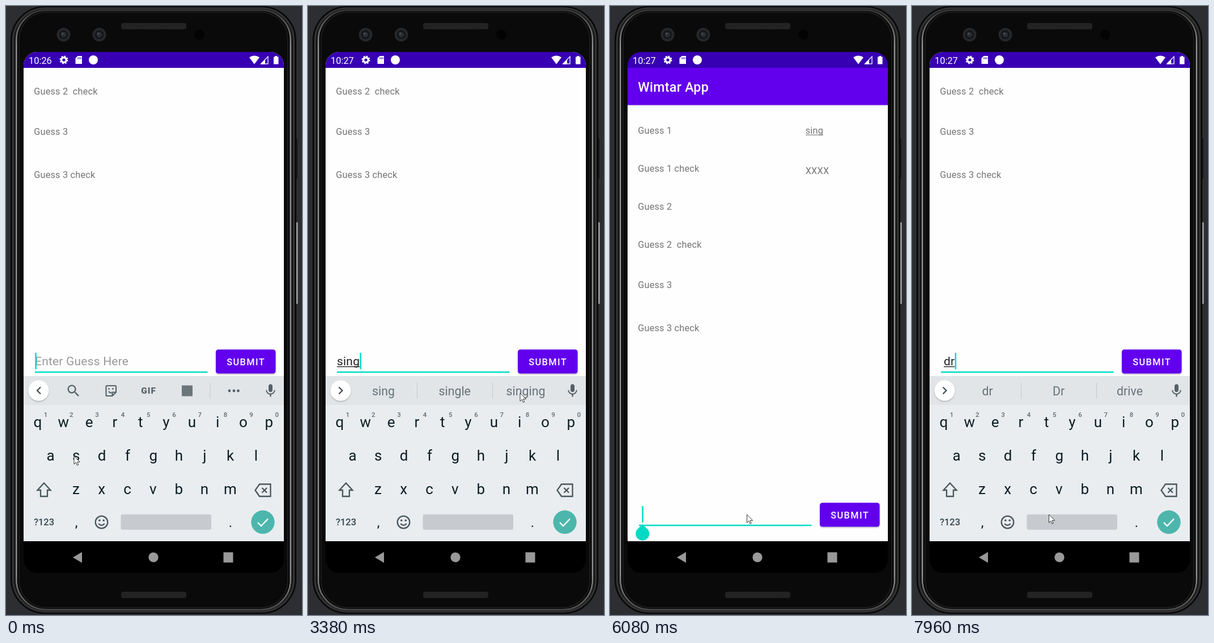
An HTML page that plays this animation: 522x1073 px, repeating every 8000 ms.

```html
<!DOCTYPE html>
<html lang="en">
<head>
<meta charset="utf-8">
<title>Word guessing app</title>
<style>
html, body { margin: 0; width: 100%; height: 100%; overflow: hidden; background: #2d2e32; }
svg { display: block; width: 522px; height: 1073px; font-family: Roboto, sans-serif; }
text { white-space: pre; }
.label { font-size: 16.3px; letter-spacing: .2px; fill: #737373; }
.field { font-size: 21px; letter-spacing: .0094em; }
.mid { text-anchor: middle; }
.line { fill: none; stroke: #48555b; stroke-width: 2.3; }
</style>
</head>
<body>
<svg id="stage" viewBox="0 0 522 1073"></svg>
<script>
const rect = (x, y, w, h, fill, more = '') =>
  `<rect x="${x}" y="${y}" width="${w}" height="${h}" fill="${fill}" ${more}/>`;
const disc = (x, y, r, fill, more = '') =>
  `<circle cx="${x}" cy="${y}" r="${r}" fill="${fill}" ${more}/>`;
const path = (d, more = '') => `<path d="${d}" ${more}/>`;
const text = (x, y, s, more = '') => `<text x="${x}" y="${y}" ${more}>${s}</text>`;
const icon = (x, y, d) =>
  path(d, `fill="#566167" transform="translate(${x} ${y}) scale(1.166) translate(-12 -12)"`);

const camera = x => disc(x, 50.5, 12, '#26282b') + disc(x, 50.5, 8, '#15171a') +
  disc(x, 50.5, 4.5, '#2b2e32') + disc(x - 2, 48.5, 1.5, '#555a60');
const speaker = y => rect(203, y, 115, 11, '#191919', 'rx="4"') +
  rect(203, y, 115, 11, 'url(#mesh)', 'rx="4"');

const phone = `
  ${rect(0, 0, 522, 1073, '#2d2e32')}
  ${rect(510, 233, 4, 72, '#17181a', 'rx="2"')}
  ${rect(511, 381, 3.5, 144, '#a5a7a9', 'rx="1.5"')}
  ${rect(9, 1, 502, 1069, '#161616', 'rx="60" stroke="#070707" stroke-width="2"')}
  ${rect(12.5, 4, 495, 1063, 'none', 'rx="57" stroke="#333" stroke-width="3"')}
  ${rect(18.3, 7.5, 483.5, 1056, '#050505', 'rx="52" stroke="url(#silver)" stroke-width="2.6"')}
  ${rect(23, 11, 474, 1049, '#0a0a0a', 'rx="48" stroke="#1c1c1c" stroke-width="2"')}
  ${camera(101.5)}${camera(164.5)}${disc(341, 50.5, 9, '#030303')}
  ${speaker(30)}${speaker(1032)}`;

const labels = [['Guess 1', 225], ['Guess 1 check', 292], ['Guess 2', 358.7],
  ['Guess 2  check', 425.7], ['Guess 3', 497], ['Guess 3 check', 573]]
  .map(([s, y]) => text(49.2, y, s, 'class="label"')).join('');

const app = `
  ${rect(31, 109, 459, 834, '#fefefe')}
  ${rect(31, 109, 459, 65.5, '#6200ee', 'filter="url(#soft)"')}
  ${text(49.3, 151.3, 'Wimtar App', 'fill="#fff" font-size="23.3" font-weight="500" letter-spacing=".25"')}
  ${labels}
  <g id="result">
    ${text(344.7, 225, 'sing', 'class="label"')}${rect(345, 226.6, 31, 1.1, '#737373')}
    ${text(344.7, 296, 'XXXX', 'class="label"')}
  </g>
  ${rect(51, 913.8, 304.5, 2.5, '#03dac5')}
  ${text(51, 903, 'Enter Guess Here', 'id="hint" class="field" fill="#999"')}
  ${text(51, 903, '', 'id="typed" class="field" fill="#212121"')}
  ${rect(51, 904.8, 0, 1.4, '#212121', 'id="under"')}
  ${rect(51, 881, 2.5, 29, '#03dac5', 'id="caret"')}
  ${rect(370, 875.3, 105.5, 42.3, '#6200ee', 'rx="4.5" filter="url(#shade)"')}
  ${text(423.2, 902.8, 'SUBMIT', 'class="mid" fill="#fff" font-size="16.3" font-weight="500" letter-spacing="1.46"')}`;

const status = `
  ${rect(31, 81, 459, 28, '#3700b3')}
  ${text(40, 101.5, '', 'id="clock" fill="#fff" font-size="16.4"')}
  ${disc(102, 95, 4.3, 'none', 'stroke="#fff" stroke-width="3.4"')}
  ${disc(102, 95, 6.4, 'none', 'stroke="#fff" stroke-width="2.2" stroke-dasharray="2.51"')}
  ${path('M126.500 88H134V102H122.500V92Z', 'fill="#fff"')}
  ${path('M127 90.500v3M129.500 90.500v3M132 90.500v3', 'stroke="#3700b3" stroke-width="1.2"')}
  ${disc(154, 95, 8, '#fff')}
  ${path('M429 90.500Q438 84.500 447 90.500L438 102.500Z', 'fill="#fff"')}
  ${path('M449.800 101.800L462 89V101.800Z', 'fill="none" stroke="#fff" stroke-width="1.3"')}
  ${path('M449 102.500L457 94V102.500Z', 'fill="#fff"')}
  ${path('M472 89.500H474.500V88H478V89.500H480.500V102.500H472Z', 'fill="#fff"')}`;

const nav = `<g fill="#999">
  ${path('M118 971.500L134 962V981Z')}${disc(260, 971.3, 8.6, '#999')}${rect(383.5, 962.5, 17, 18, '#999')}</g>`;

const row = (s, x, y) => [...s].map((c, i) => text(x + i * 45.3, y, c)).join('');
const bar = x => rect(x, 664, 1, 28, '#c4c9cc');

const keyboard = `
  ${rect(31, 652, 459, 291, '#e9edf0')}${rect(31, 652, 459, 51, '#e1e5e8')}
  ${disc(57.5, 677.5, 18, '#fff', 'filter="url(#shade)"')}
  ${path('', 'id="chevron" fill="none" stroke="#3f4a50" stroke-width="2.2"')}
  <g id="tools">
    ${icon(119, 678, 'M15.500 14h-.79l-.28-.27A6.470 6.470 0 0 0 16 9.500 6.500 6.500 0 1 0 9.500 16c1.610 0 3.090-.59 4.230-1.570l.27.28v.79l5 4.990L20.490 19l-4.990-5zm-6 0C7.010 14 5 11.990 5 9.500S7.010 5 9.500 5 14 7.010 14 9.500 11.990 14 9.500 14z')}
    <g fill="none" stroke="#566167" stroke-width="2.1">
      ${path('M178 669h14.500q1.500 0 1.500 1.500v10l-6.500 6.500h-9.500q-1.500 0-1.500-1.500v-15q0-1.500 1.500-1.500zM194 680.500h-5q-1.500 0-1.500 1.500v5M181 679q3.500 4.500 7.500 1')}
    </g>
    ${disc(181.5, 674.5, 1.4, '#566167')}${disc(188.5, 674.5, 1.4, '#566167')}
    ${text(251.5, 683, 'GIF', 'class="mid" fill="#566167" font-size="15.5" font-weight="900" letter-spacing="1"')}
    ${rect(310, 668.5, 19, 19, '#6b757a')}
    ${bar(359.5)}
    ${[394, 402, 409.5].map(x => disc(x, 678, 2.4, '#566167')).join('')}
  </g>
  <g id="words" class="mid" fill="#677277" font-size="21.3">
    ${[133, 258.7, 384].map(x => text(x, 686, '')).join('')}${bar(192)}${bar(325)}
  </g>
  ${icon(466.5, 678, 'M12 14c1.660 0 3-1.340 3-3V5c0-1.660-1.340-3-3-3S9 3.340 9 5v6c0 1.660 1.340 3 3 3zM17.300 11c0 3-2.540 5.100-5.300 5.100S6.700 14 6.700 11H5c0 3.410 2.720 6.230 6 6.720V21h2v-3.280c3.280-.48 6-3.300 6-6.720z')}
  <g class="mid" fill="#0b1c23" font-size="26">
    ${row('qwertyuiop', 56, 742)}${row('asdfghjkl', 78.5, 801)}${row('zxcvbnm', 123.5, 860)}
    ${text(124, 918, ',', 'font-size="24"')}${text(396, 918, '.', 'font-size="24"')}
  </g>
  <g class="mid" fill="#5f6a6f" font-size="11.5" font-weight="500">${row('1234567890', 70, 723.5)}</g>
  ${text(67, 915.3, '?123', 'class="mid" fill="#37474f" font-size="16.5" font-weight="500"')}
  <g class="line">
    ${path('M67 840.500L78.500 853H73V864H61V853H55.500Z')}
    ${path('M447 842.500H466.500V864H447L439.500 853.200ZM451.500 849l8.500 8.500M460 849l-8.500 8.500')}
    ${disc(168.5, 909.5, 10.8, 'none')}
    ${path('M163.200 912q5.300 6 10.600 0')}
  </g>
  ${disc(164.8, 906.3, 1.8, '#48555b')}${disc(172.2, 906.3, 1.8, '#48555b')}
  ${rect(202.5, 895.8, 159.5, 27, '#c7cbcf', 'rx="3"')}
  ${disc(453, 909.3, 20.7, '#4db6ac')}
  ${path('M444 910l6 6 12-12.500', 'fill="none" stroke="#fff" stroke-width="2.3"')}`;

document.getElementById('stage').innerHTML = `
  <defs>
    <clipPath id="screen">${rect(31, 81, 459, 918, '#000', 'rx="24"')}</clipPath>
    <pattern id="mesh" width="3" height="3" patternUnits="userSpaceOnUse">
      ${disc(1, 1, .8, '#3c3c3c')}${disc(2.5, 2.5, .6, '#333')}</pattern>
    <linearGradient id="silver" x2="0" y2="1">
      <stop stop-color="#3a3a3a"/><stop offset=".06" stop-color="#8d8d8d"/>
      <stop offset=".94" stop-color="#8d8d8d"/><stop offset="1" stop-color="#4a4a4a"/></linearGradient>
    <filter id="shade"><feDropShadow dx="0" dy="1.5" stdDeviation="1.2" flood-opacity=".28"/></filter>
    <filter id="soft"><feDropShadow dx="0" dy="1" stdDeviation=".8" flood-opacity=".15"/></filter>
  </defs>
  ${phone}
  <g clip-path="url(#screen)">
    ${rect(31, 81, 459, 918, '#000')}
    <g id="app">${app}</g>
    ${status}${nav}
    <g id="keys">${keyboard}</g>
    ${path('M57.300 913L66 921.500A12 12 0 1 1 48.600 921.500Z', 'id="handle" fill="#03dac5"')}
  </g>
  ${path('M0 0V14.300L3.300 11.200 5.500 16.300 7.700 15.400 5.500 10.400H10.200Z', 'id="mouse" fill="#fff" stroke="#222" stroke-width=".9"')}`;

const el = id => document.getElementById(id);
const show = (id, on) => { el(id).style.display = on ? '' : 'none'; };
const move = (id, x, y) => el(id).setAttribute('transform', `translate(${x} ${y})`);
const clamp = v => Math.max(0, Math.min(1, v));
const slots = [...el('words').querySelectorAll('text')];

const ticks = [0, 120, 270, 390, 670, 790, 1070, 1190, 1340, 1460, 1580, 1730, 1850, 2130,
  2440, 2590, 2710, 2990, 3110, 3260, 3380, 3530, 3650, 3800, 4080, 4200, 4320, 4440, 4590,
  4860, 5010, 5130, 5280, 5400, 5550, 5670, 6080, 6210, 6360, 6480, 7010, 7380, 7530, 7840, 7960];

// time, typed text, suggestions
const edits = [
  [0, '', ''], [120, 's', 's so she'], [1070, 'si', 'si six since'],
  [2130, 'sin', 'sin since sincerely'], [2990, 'sing', 'sing single singing'],
  [4080, '', 'sing single singing'], [5980, ' ', ''], [7380, ' d', ''],
  [7530, ' d', 'd do did'], [7840, ' dr', 'd do did'], [7960, ' dr', 'dr Dr drive']];

// time, x, y
const route = [
  [0, 120, 793], [120, 120, 793], [790, 366, 738], [1070, 366, 738], [1850, 343, 852],
  [2290, 343, 852], [2710, 256, 804], [2990, 256, 804], [3380, 374, 682], [3800, 420, 626],
  [4590, 420, 626], [5130, 299.5, 977], [5670, 241.5, 896], [8000, 241.5, 896]];

const PAN = 270, BLINK = 500;

function pointer(t) {
  const i = route.findIndex(p => p[0] > t);
  const [t0, x0, y0] = route[i - 1], [t1, x1, y1] = route[i];
  const k = (t - t0) / (t1 - t0);
  return [x0 + (x1 - x0) * k, y0 + (y1 - y0) * k];
}

function draw(t) {
  const [since, typed, words] = edits.findLast(e => e[0] <= t);
  const out = clamp((t - 4080) / 353);
  const left = 1 - clamp((t - 6080) / 243);
  const opening = t >= 6080;

  // Closing the keyboard lets the window slide down; opening pushes it up.
  const pan = opening ? PAN * (1 - left ** 3) : PAN * (1 - out) ** 2;
  move('app', 0, -pan);
  move('keys', 0, opening ? 39 * left : 60 * out);
  el('keys').style.opacity = opening ? 1 - left ** 2 : 1 - out ** 1.5;

  const x = typed[0] === ' ' ? 56 : 51;
  const field = el('typed');
  field.textContent = typed.trim();
  field.setAttribute('x', x);
  const width = typed.trim() ? field.getComputedTextLength() : 0;
  el('under').setAttribute('x', x);
  el('under').setAttribute('width', width);
  el('caret').setAttribute('x', x + width + .3);
  show('caret', Math.floor((t - since) / BLINK) % 2 === 0);
  show('hint', t < 120);
  show('result', t >= 4080);

  show('handle', opening && t < 7380);
  move('handle', 0, -PAN * (1 - left ** 1.6));

  el('clock').textContent = t < 2990 ? '10:26' : '10:27';
  show('tools', !words);
  show('words', words);
  words.split(' ').forEach((w, i) => { slots[i].textContent = w; });
  el('chevron').setAttribute('d', words ? 'M54.500 671.500l6 6-6 6' : 'M61 671.500l-6 6 6 6');
  move('mouse', ...pointer(t));
}

function frame() {
  const t = performance.now() % 8000;
  draw(ticks.findLast(k => k <= t));
  requestAnimationFrame(frame);
}
frame();
</script>
</body>
</html>
```
